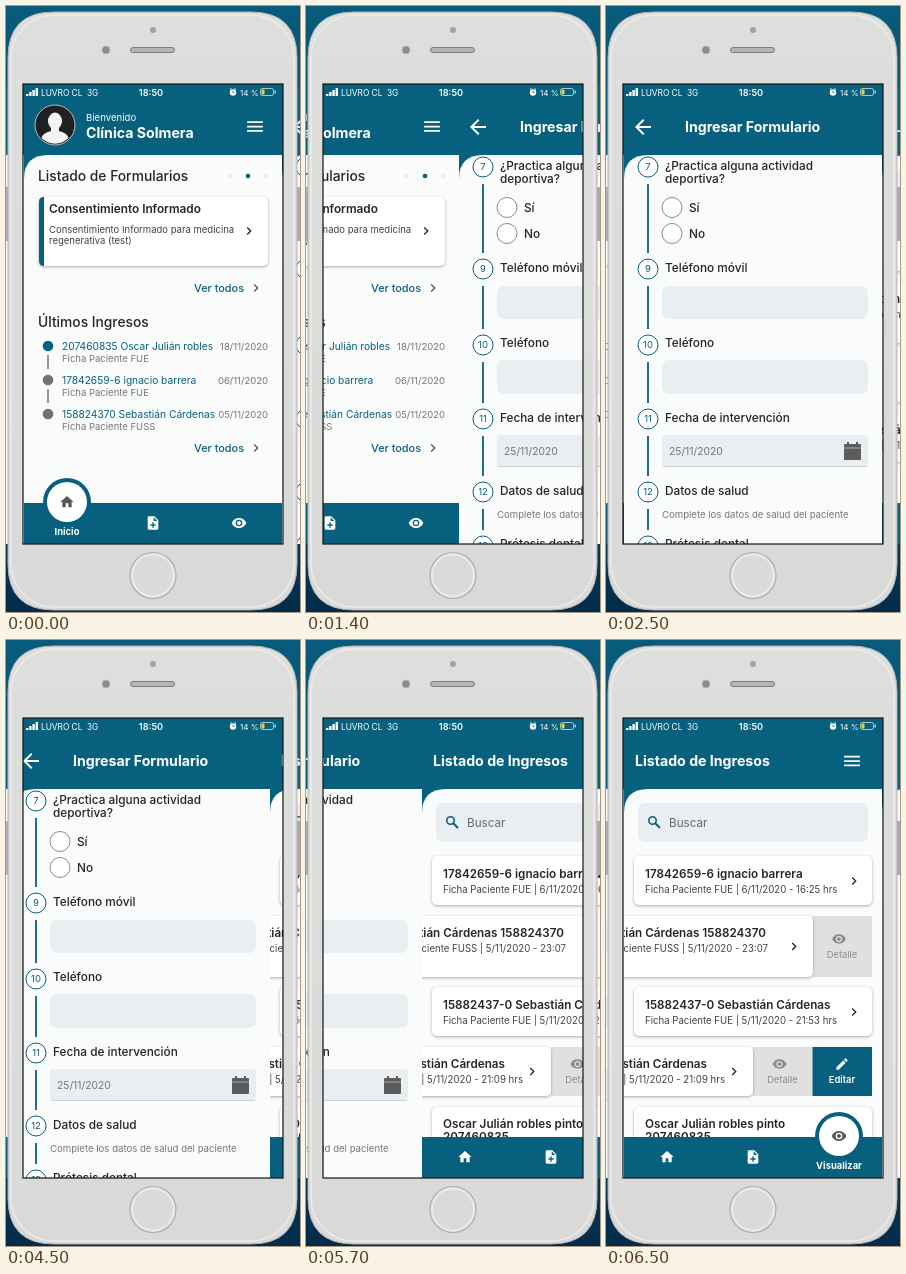
Recreate the animation shown at these times as an HTML page. Size 294 px wide and 606 px high, loop 8 s.

```html
<!DOCTYPE html>
<html lang="es">
<head>
<meta charset="utf-8">
<title>Formularios</title>
<style>
  html, body { margin: 0; width: 100%; height: 100%; overflow: hidden; background: #07587a; }
  #stage { display: block; width: 100%; height: 100%; font-family: Inter, Roboto, sans-serif; }
  .card { fill: #fff; filter: drop-shadow(0 1px 1.5px rgba(0, 0, 0, .32)); }
</style>
</head>
<body>
<svg id="stage" viewBox="0 0 294 606"></svg>
<script>
const TEAL = '#07607d', PAPER = '#fafbfb', INK = '#222529', GREY = '#757779', FIELD = '#e9eef3';
const LEFT = 18, PITCH = 258, HEADER_END = 149, NAV_TOP = 497;
const STEPS = 21, STEP_MS = 100, LOOP_MS = 8000;
const SLIDE_STARTS = [500, 4500];

const ICONS = {
  home: 'M10 20v-6h4v6h5v-8h3L12 3 2 12h3v8z',
  file: 'M14 2H6a2 2 0 0 0-2 2v16a2 2 0 0 0 2 2h12a2 2 0 0 0 2-2V8zm2 14h-3v3h-2v-3H8v-2h3v-3h2v3h3zM13 9V3.5L18.5 9z',
  eye: 'M12 4.5C7 4.5 2.7 7.6 1 12c1.7 4.4 6 7.5 11 7.5s9.3-3.1 11-7.5c-1.7-4.4-6-7.5-11-7.5zM12 17a5 5 0 1 1 0-10 5 5 0 0 1 0 10zm0-8a3 3 0 1 0 0 6 3 3 0 0 0 0-6z',
  edit: 'M3 17.2V21h3.8L17.8 9.9l-3.7-3.7zM20.7 7a1 1 0 0 0 0-1.4l-2.3-2.3a1 1 0 0 0-1.4 0l-1.9 1.8 3.8 3.8z',
  back: 'M20 11H7.8l5.6-5.6L12 4l-8 8 8 8 1.4-1.4L7.8 13H20z',
  next: 'M10 6 8.6 7.4 13.2 12l-4.6 4.6L10 18l6-6z',
  menu: 'M3 18h18v-2H3zm0-5h18v-2H3zm0-7v2h18V6z'
};

// Drawing helpers; every page uses the coordinates it has when at rest on screen.
const rect = (x, y, w, h, fill, r = 0, extra = '') =>
  `<rect x="${x}" y="${y}" width="${w}" height="${h}" rx="${r}" fill="${fill}" ${extra}/>`;
const card = (x, y, w, h) => rect(x, y, w, h, '#fff', 5, 'class="card"');
const circle = (x, y, r, fill, extra = '') =>
  `<circle cx="${x}" cy="${y}" r="${r}" fill="${fill}" ${extra}/>`;
const line = (x1, y1, x2, y2, color, width = 1.5) =>
  `<path d="M${x1} ${y1}L${x2} ${y2}" stroke="${color}" stroke-width="${width}"/>`;
const text = (x, y, size, string, fill = INK, weight = 400, anchor = 'start') =>
  `<text x="${x}" y="${y}" font-size="${size}" fill="${fill}" font-weight="${weight}" text-anchor="${anchor}">${string}</text>`;
const heading = (x, y, string) => text(x, y, 14.15, string, '#fff', 700);
const icon = (name, x, y, size, fill) =>
  `<path d="${ICONS[name]}" fill="${fill}" fill-rule="evenodd" transform="translate(${x - size / 2} ${y - size / 2}) scale(${size / 24})"/>`;
const chevron = (x, y, fill = INK) => icon('next', x, y, 16, fill);

const page = (index, content = '') =>
  `<svg x="${LEFT + PITCH * index}" y="78" width="${PITCH}" height="460" viewBox="${LEFT} 78 ${PITCH} 460">
    ${rect(LEFT, 78, PITCH, 460, TEAL)}
    <path d="M${LEFT} 538V${HEADER_END + 24}q0-24 24-24H277V538z" fill="${PAPER}"/>${content}</svg>`;

function navBar(active) {
  const items = [['home', 61, 'Inicio'], ['file', 147, 'Nuevo'], ['eye', 233, 'Visualizar']];
  return rect(LEFT, NAV_TOP, PITCH, 41, TEAL) + items.map(([name, x, label]) => name === active
    ? circle(x, 496, 24, TEAL) + circle(x, 496, 20, '#fff') + icon(name, x, 496, 16, '#58595b') +
      text(x, 528.5, 9.4, label, '#fff', 700, 'middle')
    : icon(name, x, 517, 16, '#fff')).join('');
}

function homePage() {
  const seeAll = y => text(188, y + 4, 10.9, 'Ver todos', TEAL, 500) + chevron(250, y, '#555');
  const entries = [
    ['207460835 Oscar Julián robles', '18/11/2020', 'FUE', TEAL],
    ['17842659-6 ignacio barrera', '06/11/2020', 'FUE', '#6f7173'],
    ['158824370 Sebastián Cárdenas', '05/11/2020', 'FUSS', '#6f7173']
  ];
  return circle(49, 119, 20, '#202124', 'stroke="#d8dde0" stroke-width=".8"') +
    '<path d="M35.5 132q1-5 9.5-7v-3a7 8.5 0 1 1 8 0v3q8.5 2 9.5 7a19 19 0 0 1-27 0z" fill="#f4f4f4"/>' +
    text(80, 114.5, 9.6, 'Bienvenido', '#fff') +
    heading(80, 131.5, 'Clínica Solmera') +
    icon('menu', 249, 120.5, 21, '#fff') +
    text(32, 175, 13.8, 'Listado de Formularios', INK, 500) +
    circle(224, 170, 1.8, '#e3e8ec') + circle(242, 170, 2.3, TEAL) + circle(260, 170, 1.8, '#e3e8ec') +
    card(33, 191, 229, 69) +
    `<path d="M38 191V260Q33 260 33 255V196Q33 191 38 191z" fill="${TEAL}"/>` +
    text(43, 207, 11.8, 'Consentimiento Informado', INK, 600) +
    text(43, 226.5, 9.5, 'Consentimiento Informado para medicina', '#3f4245') +
    text(43, 238, 9.5, 'regenerativa (test)', '#3f4245') +
    chevron(243, 225) + seeAll(282) +
    text(32, 321, 13.8, 'Últimos Ingresos', INK, 500) +
    entries.map(([name, date, form, dot], i) => {
      const y = 340 + 34 * i;
      return circle(42, y, 5.3, dot) + (i < 2 ? line(42, y + 9, 42, y + 23, '#77797b') : '') +
        text(56, y + 4, 10.2, name, TEAL) +
        text(56, y + 15.5, 9.5, 'Ficha Paciente ' + form, GREY) +
        text(262, y + 3.5, 9.5, date, GREY, 400, 'end');
    }).join('') + seeAll(442) + navBar('home');
}

function formPage() {
  const numbers = [[7, 161], [9, 263], [10, 339], [11, 413], [12, 486], [13, 540]];
  const label = (y, string) => text(59, y, 11.8, string, INK, 500);
  const option = (y, string) =>
    circle(66, y, 10, '#fff', 'stroke="#8a8c8e"') + text(83, y + 4, 11.8, string, INK, 500);
  return icon('back', 37, 121, 24, '#fff') +
    heading(79, 126, 'Ingresar Formulario') +
    numbers.map(([n, y], i) =>
      circle(42, y, 10, '#fff', `stroke="${TEAL}"`) + text(42, y + 3.4, 9.5, n, TEAL, 400, 'middle') +
      (i < 5 ? line(42, y + 17, 42, numbers[i + 1][1] - 16, TEAL, 1.8) : '')).join('') +
    label(163.5, '¿Practica alguna actividad') + label(177, 'deportiva?') +
    option(201.5, 'Sí') + option(227.5, 'No') +
    label(266, 'Teléfono móvil') + rect(56, 280, 206, 33, FIELD, 7) +
    label(341, 'Teléfono') + rect(56, 354, 206, 34, FIELD, 7) +
    label(416, 'Fecha de intervención') + rect(56, 429, 206, 32, FIELD, 3) +
    line(57, 460.5, 261, 460.5, '#cdd2d6', 1) +
    text(63, 448.5, 10.3, '25/11/2020', GREY) +
    rect(238, 438, 17, 16, '#5c5c5c', 1) + rect(241, 436, 2, 3, '#5c5c5c') + rect(250, 436, 2, 3, '#5c5c5c') +
    line(238, 442, 255, 442, '#a5a8aa', 1) +
    label(489, 'Datos de salud') +
    text(56, 511.5, 9.6, 'Complete los datos de salud del paciente', GREY) +
    label(541.5, 'Prótesis dental');
}

function listPage() {
  const title = (x, y, string, anchor) => text(x, y, 11.7, string, INK, 600, anchor);
  const detail = (x, y, string, anchor) => text(x, y, 9.65, string, '#3f4245', 400, anchor);
  const entry = (y, name, info) => card(28, y, 238, 49) +
    title(39, y + 21.5, name) + detail(39, y + 36.5, info) + chevron(248, y + 25);
  const action = (x, y, h, name, string, fill, color, weight) => rect(x, y, 59.5, h, fill) +
    icon(name, x + 29.5 - (name === 'eye' ? 3 : 0), y + h / 2 - 7.5, 15, color) +
    text(x + 29.5, y + h / 2 + 11.5, 9.4, string, color, weight, 'middle');
  const swiped = (y, h, right, name, nameEnd, info, infoEnd) => card(-40, y, right + 40, h) +
    title(nameEnd, y + 21, name, 'end') + detail(infoEnd, y + 36, info, 'end') +
    chevron(right - 19, y + h / 2);
  return heading(29, 126, 'Listado de Ingresos') +
    icon('menu', 246, 121, 21, '#fff') +
    rect(32, 163, 230, 39, FIELD, 7) +
    circle(46.5, 180.5, 3.7, 'none', `stroke="${TEAL}" stroke-width="1.6"`) +
    line(49, 183, 54, 188, TEAL, 2) +
    text(63, 186.5, 11.7, 'Buscar', '#66696c') +
    entry(216, '17842659-6 ignacio barrera', 'Ficha Paciente FUE | 6/11/2020 - 16:25 hrs') +
    action(206.5, 276, 61, 'eye', 'Detalle', '#e0e0de', '#8b8c8d', 400) +
    swiped(276, 61, 207, 'Sebastián Cárdenas 158824370', 160, 'Ficha Paciente FUSS | 5/11/2020 - 23:07', 162) +
    entry(347, '15882437-0 Sebastián Cárdenas', 'Ficha Paciente FUE | 5/11/2020 - 21:53 hrs') +
    action(147, 407, 49, 'eye', 'Detalle', '#e0e0de', '#8b8c8d', 400) +
    action(206.5, 407, 49, 'edit', 'Editar', TEAL, '#fff', 600) +
    swiped(407, 49, 147, '158824370 Sebastián Cárdenas', 101, 'Ficha Paciente FUE | 5/11/2020 - 21:09 hrs', 119) +
    card(28, 467, 238, 62) + title(39, 488, 'Oscar Julián robles pinto') + title(39, 501, '207460835') +
    navBar('eye');
}

function phone() {
  const body = 'M48 6H245Q291 6 291 52V558Q291 604 245 604H48Q2 604 2 558V52Q2 6 48 6z';
  return rect(0, 181, 3, 54, '#a9abb0') + rect(291, 181, 3, 54, '#a9abb0') +
    `<path d="${body}M17 78V538H277V78z" fill="url(#shell)" fill-rule="evenodd"/>
    <path d="${body}" fill="none" stroke="#b4b4b5"/>
    <rect x="5" y="9" width="283" height="592" rx="43" fill="none" stroke="#ebebeb" stroke-width="1.5"/>` +
    rect(17, 78, 260, 460, 'none', 0, 'stroke="#111518" stroke-width="1.2"') +
    circle(147, 24, 3, '#a2a2a3') +
    circle(100, 44, 4, '#8b8b8d', 'stroke="#b8b8b9"') +
    rect(124.5, 41.5, 44, 5, '#b5b5b6', 2.5, 'stroke="#7c7c7e"') +
    circle(147, 569.5, 23, '#e6e6e6', 'stroke="#adadae" stroke-width="1.2"') +
    circle(147, 569.5, 20.5, '#dadada', 'stroke="#efefef"');
}

function statusBar() {
  const bars = [2, 4, 6, 8].map((h, i) => rect(20 + 3.2 * i, 90 - h, 2.4, h, '#fff')).join('');
  return bars + text(35, 89.5, 8.3, 'LUVRO CL', '#fff') + text(81, 89.5, 8.3, '3G', '#fff') +
    text(145, 89.5, 9.2, '18:50', '#fff', 600, 'middle') +
    circle(227, 86.5, 3.2, '#fff') + line(224, 83.5, 225.5, 82.3, '#fff', 1) +
    line(230, 83.5, 228.5, 82.3, '#fff', 1) +
    `<path d="M227 84.5v2h1.5" fill="none" stroke="${TEAL}" stroke-width=".8"/>` +
    text(234, 89.5, 8.1, '14 %', '#fff') +
    rect(254.5, 82.5, 13, 7, 'none', 2, 'stroke="#d6e2e7" stroke-width=".8"') +
    rect(255.5, 83.5, 3, 5, '#f5cf2e', 1) + rect(268.5, 84.5, 1.2, 3, '#d6e2e7');
}

const stage = document.getElementById('stage');
stage.innerHTML = `<defs>
    <linearGradient id="backdrop" x2="0" y2="1"><stop stop-color="#085b7c"/><stop offset=".8" stop-color="#064163"/><stop offset="1" stop-color="#042c4a"/></linearGradient>
    <linearGradient id="shell" x2="0" y2="1"><stop stop-color="#dededd"/><stop offset="1" stop-color="#d9d9d8"/></linearGradient>
  </defs>
  ${rect(0, 0, 294, 606, 'url(#backdrop)')}
  <g id="pages">${page(-1)}${page(0, homePage())}${page(1, formPage())}${page(2, listPage())}${page(3)}</g>
  ${phone()}${statusBar()}`;
const pages = document.getElementById('pages');

// Two linear slides, each advancing in 21 discrete steps.
function draw() {
  const t = performance.now() % LOOP_MS;
  const steps = SLIDE_STARTS.reduce((sum, start) =>
    sum + Math.min(STEPS, Math.max(0, Math.floor((t - start) / STEP_MS) + 1)), 0);
  pages.setAttribute('transform', `translate(${-Math.round(PITCH * steps / STEPS)} 0)`);
  requestAnimationFrame(draw);
}
draw();
</script>
</body>
</html>
```
